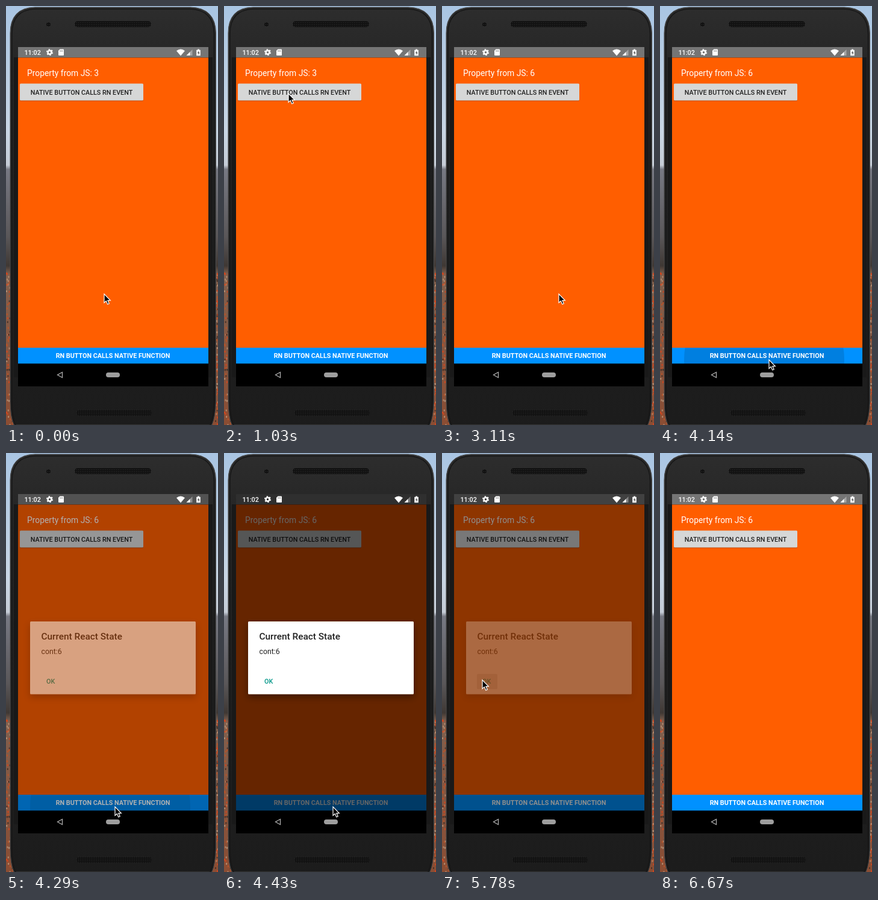
These frames come from a looping animation (352x694 px, 6.93 s). An HTML page:

```html
<!DOCTYPE html>
<html lang="en">
<head>
<meta charset="utf-8">
<title>Native and RN buttons</title>
<style>
  html, body { margin: 0; width: 100%; height: 100%; overflow: hidden; background: #1d1d1d; }
  svg { display: block; width: 352px; height: 694px; font: 500 10.77px Roboto, sans-serif; }
</style>
</head>
<body>
<svg viewBox="0 0 352 694">
  <defs>
    <linearGradient id="scenery" x2="0" y2="1">
      <stop offset="0" stop-color="#a9c5e3"/>
      <stop offset=".3" stop-color="#c9d6e4"/>
      <stop offset=".38" stop-color="#c5ccd6"/>
      <stop offset=".39" stop-color="#777983"/>
      <stop offset=".55" stop-color="#5a5759"/>
      <stop offset=".62" stop-color="#3f3834"/>
      <stop offset=".64" stop-color="#80604e"/>
      <stop offset="1" stop-color="#8b4d33"/>
    </linearGradient>
    <linearGradient id="body" x2="0" y2="1">
      <stop offset="0" stop-color="#2d2d2d"/>
      <stop offset=".15" stop-color="#252525"/>
      <stop offset="1" stop-color="#1c1c1c"/>
    </linearGradient>
    <pattern id="mesh" width="3" height="3" patternUnits="userSpaceOnUse">
      <path d="M0 0h3v3h-3z" fill="#111"/>
      <path d="M0 0h1v1h-1z" fill="#343434"/>
    </pattern>
    <clipPath id="nativeClip"><rect x="23" y="128.5" width="205" height="28" rx="1.5"/></clipPath>
    <clipPath id="rnClip"><path d="M20 566h316v26.5H20z"/></clipPath>
    <filter id="shadow" x="-20%" y="-20%" width="140%" height="160%">
      <feDropShadow dx="0" dy="5" stdDeviation="6" flood-opacity=".4"/>
    </filter>
  </defs>

  <path d="M0 0h352v694H0z" fill="url(#scenery)"/>
  <g id="foliage"></g>

  <!-- phone -->
  <path d="M7 45Q7 3 48 2H306Q348 3 348.5 45V655Q348 680 342 694H13Q7 680 7 655z" fill="url(#body)" stroke="#4b4b4b"/>
  <path d="M10 46Q10 6 49 5H305Q345 6 345.500 46V655Q345 680 339 694M16 694Q10 680 10 655V46" fill="none" stroke="#171717" stroke-width="1.500"/>
  <path d="M13 85h7v530h-7zM336 85h7v530h-7z" fill="#191919"/>
  <g fill="url(#mesh)">
    <rect x="114" y="25" width="127" height="10" rx="5"/>
    <rect x="117" y="669" width="125" height="10" rx="5"/>
    <circle cx="70.500" cy="30.500" r="3.500"/>
  </g>

  <!-- app -->
  <path d="M20 68h316v562H20z"/>
  <path d="M20 68h316v17.500H20z" fill="#757575"/>
  <path d="M20 85.500h316V566H20z" fill="#ff5e00"/>
  <text x="35" y="116" fill="#fff" font-size="13.85" font-weight="400">Property from JS: <tspan id="count">3</tspan></text>
  <rect x="23" y="129.500" width="205" height="28" rx="1.500" fill="#000" opacity=".25"/>
  <rect x="23" y="128.500" width="205" height="28" rx="1.500" fill="#d6d7d7"/>
  <circle id="nativeRipple" cx="107" cy="145" r="119" opacity="0" clip-path="url(#nativeClip)"/>
  <text x="125.500" y="147" text-anchor="middle" fill="#212121">NATIVE BUTTON CALLS RN EVENT</text>
  <path d="M20 566h316v26.500H20z" fill="#0091ff"/>
  <circle id="rnRipple" cx="173" cy="586" r="133" opacity="0" clip-path="url(#rnClip)"/>
  <text x="177.500" y="583.300" text-anchor="middle" fill="#fff" font-weight="700">RN BUTTON CALLS NATIVE FUNCTION</text>
  <path id="dim" d="M20 68h316v562H20z" opacity="0"/>

  <!-- system bars -->
  <path d="M20 592.500h316V630H20z"/>
  <path d="M93.500 606.500v9l-8-4.500z" fill="none" stroke="#b0b0b0" stroke-width="1.300"/>
  <rect x="166" y="607" width="23" height="8" rx="4" fill="#9e9e9e"/>
  <g fill="#fff">
    <text x="30.500" y="81">11:02</text>
    <g fill="none" stroke="#fff">
      <circle cx="72.500" cy="76.700" r="3" stroke-width="2.400"/>
      <circle cx="72.500" cy="76.700" r="4.700" stroke-width="1.700" stroke-dasharray="2.460"/>
    </g>
    <path d="M89.500 71.500h5.500q1 0 1 1v8.500q0 1-1 1h-7q-1 0-1-1v-7z"/>
    <path d="M89.800 73.500v2M91.800 73.500v2M93.800 73.500v2" stroke="#757575"/>
    <path d="M283 74.300Q290 68.700 297 74.300L290 82.500z"/>
    <path d="M309.500 72v10h-10z" opacity=".35"/>
    <path d="M305.500 76v6h-6z"/>
    <path d="M318.300 71.500h2.500v1.200h2v9.600h-6.600v-9.600h2.100z"/>
    <path d="M320.200 74l-2.300 4h1.500v3l2.200-4h-1.400z" fill="#555"/>
  </g>

  <g id="dialog" opacity="0">
    <rect x="40" y="279" width="275" height="120.500" rx="1.500" fill="#fff" filter="url(#shadow)"/>
    <text x="58.500" y="309" font-size="15.400" fill="#212121">Current React State</text>
    <text x="58.500" y="333" font-size="12.300" font-weight="400" fill="#212121">cont:6</text>
    <rect id="okPress" x="58" y="366" width="34" height="25" rx="1.500" opacity="0"/>
    <text x="67" y="382" fill="#009688">OK</text>
  </g>

  <path id="cursor" d="M0 0V14.500L3.300 11.500L5.700 17L8.200 16L5.900 10.600H10.300z" stroke="#fff" stroke-width="1.200"/>
</svg>

<script>
const LOOP = 6930, STEP = 147.9;
const $ = id => document.getElementById(id);
const fade = (id, opacity) => $(id).setAttribute('opacity', opacity);

// Cursor stops as [step, x, y]
const path = [
  [0, 163, 477], [7, 107, 145], [18, 107, 145], [21, 194, 477], [22, 194, 477],
  [25, 181, 586], [32, 181, 586], [37, 67, 376], [39, 67, 376], [45, 112, 700]
];

let seed = 7;
const random = () => (seed = seed * 16807 % 2147483647) / 2147483647;

function plantFoliage() {
  const colors = ['#b5532a', '#4a352b', '#b08a70', '#d0461f'];
  let specks = '';
  for (let i = 0; i < 240; i++) {
    const x = random() < .6 ? random() * 12 : 346 + random() * 5;
    const y = 440 + random() * 254;
    specks += `<path d="M${x} ${y}h2v3h-2z" fill="${colors[i % 4]}"/>`;
  }
  $('foliage').innerHTML = specks;
}

function cursorAt(step) {
  const next = path.findIndex(stop => stop[0] > step);
  if (next < 0) return path.at(-1).slice(1);
  const [s0, x0, y0] = path[next - 1], [s1, x1, y1] = path[next];
  const u = (step - s0) / (s1 - s0), e = u * u * (3 - 2 * u);
  return [x0 + (x1 - x0) * e, y0 + (y1 - y0) * e];
}

function draw(now) {
  const step = Math.floor((now % LOOP + 8) / STEP);
  const [x, y] = cursorAt(step);
  $('cursor').setAttribute('transform', `translate(${x} ${y})`);
  $('count').textContent = 3 + [9, 14, 18].filter(s => step >= s).length;

  const pressed = [8, 13, 17].includes(step), released = [9, 14, 18].includes(step);
  fade('nativeRipple', pressed ? .13 : released ? .07 : 0);
  fade('rnRipple', step === 28 ? .12 : step === 29 ? .08 : 0);

  const open = step >= 30 && step < 39;
  fade('dim', open ? .6 : step === 29 ? .3 : step === 39 ? .445 : 0);
  fade('dialog', open ? 1 : step === 29 ? .5 : step === 39 ? .26 : 0);
  fade('okPress', step === 38 || step === 39 ? .12 : 0);
  requestAnimationFrame(draw);
}

plantFoliage();
requestAnimationFrame(draw);
</script>
</body>
</html>
```
